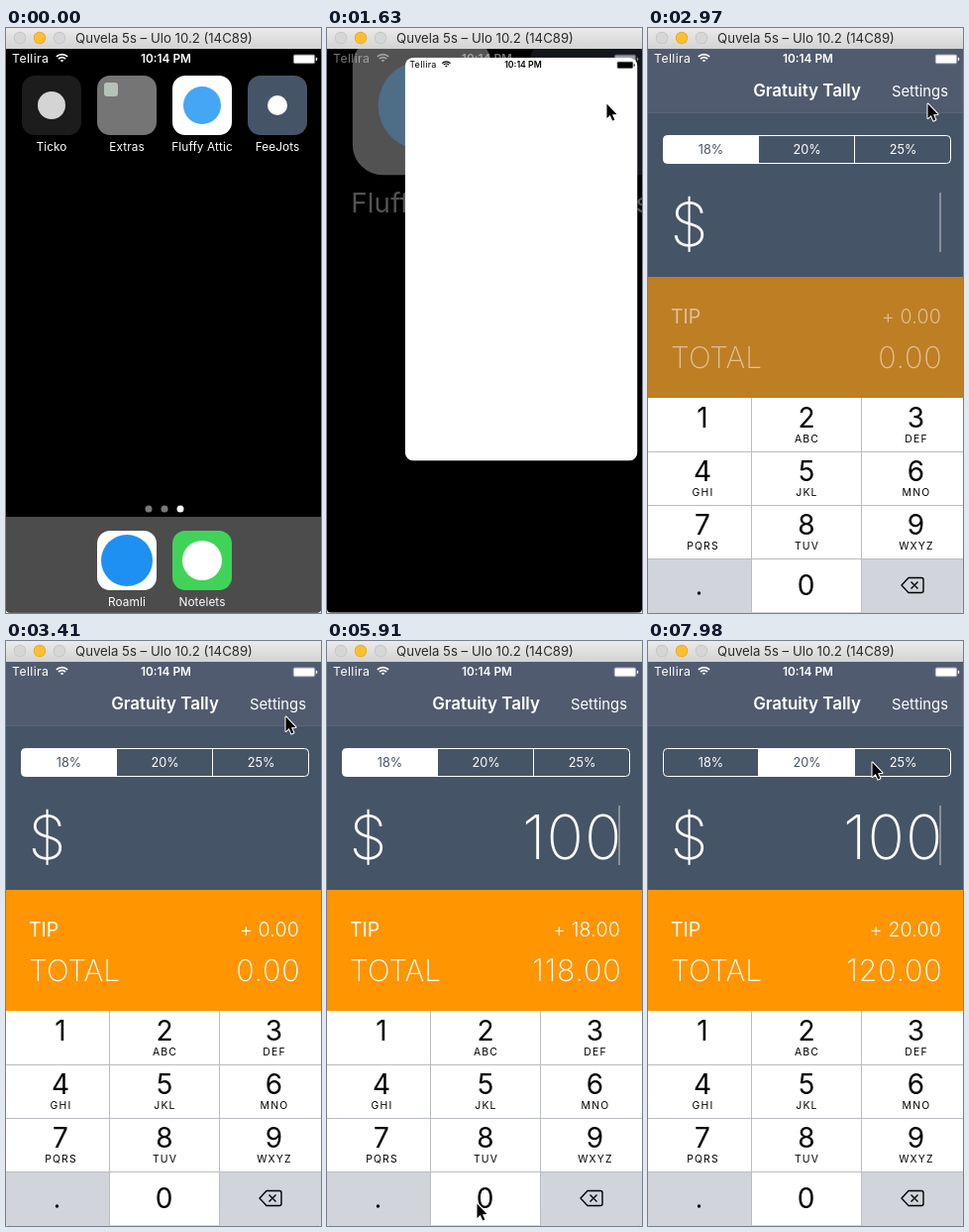
Animation, 318 px wide and 590 px high, one loop 8 s. Source, as an HTML page with a canvas:

```html
<!DOCTYPE html>
<html lang="en">
<head>
<meta charset="utf-8">
<title>Bill splitter</title>
<style>
  html, body { margin: 0; width: 100%; height: 100%; overflow: hidden; background: #fff; }
  canvas { display: block; width: 318px; height: 590px; }
</style>
</head>
<body>
<canvas id="stage"></canvas>
<script>
const W = 318, H = 590, TOP = 21;
const LOOP = 8000, REFRESH = LOOP / 54, LEAD = 25;
const APP_START = 2510, POINTER_START = 1030, RATE_TAP = 7530, HOLD = 150;
const SLATE = '#465467', ORANGE = '#ff9500', KEY_GREY = '#d1d4da', LINE = '#b9bcc1';

const canvas = document.getElementById('stage');
const ctx = canvas.getContext('2d');
const ratio = window.devicePixelRatio || 1;
canvas.width = W * ratio;
canvas.height = H * ratio;

const TAPS = [{ at: 4860, key: 1 }, { at: 5450, key: 0 }, { at: 5750, key: 0 }];
const MOVES = [
  { from: 1030, to: 1340, x: 282, y: 76 },
  { from: 3410, to: 4580, x: 78, y: 400 },
  { from: 5010, to: 5460, x: 151, y: 567 },
  { from: 6360, to: 7250, x: 175, y: 115 },
  { from: 7690, to: 8000, x: 226, y: 122 }
];

const progress = (t, from, to) => Math.min(1, Math.max(0, (t - from) / (to - from)));
const smooth = (t, from, to) => {
  const p = progress(t, from, to);
  return p * p * (3 - 2 * p);
};
const held = (t, at) => t >= at && t < at + HOLD;

function rect(x, y, w, h, color) {
  ctx.fillStyle = color;
  ctx.fillRect(x, y, w, h);
}

function roundPath(x, y, w, h, r) {
  ctx.beginPath();
  ctx.roundRect(x, y, w, h, r);
}

function roundFill(x, y, w, h, r, color) {
  roundPath(x, y, w, h, r);
  ctx.fillStyle = color;
  ctx.fill();
}

function disc(x, y, r, color) {
  ctx.beginPath();
  ctx.arc(x, y, r, 0, Math.PI * 2);
  ctx.fillStyle = color;
  ctx.fill();
}

function text(str, x, y, size, { weight = 400, color = '#fff', align = 'left', gap = 0 } = {}) {
  ctx.font = `${weight} ${size}px Inter, Roboto, sans-serif`;
  ctx.letterSpacing = gap + 'px';
  ctx.textAlign = align;
  ctx.fillStyle = color;
  ctx.fillText(str, x, y);
}

function layer(alpha, draw) {
  ctx.save();
  ctx.globalAlpha *= alpha;
  draw();
  ctx.restore();
}

function titleBar() {
  const shade = ctx.createLinearGradient(0, 0, 0, TOP);
  shade.addColorStop(0, '#ebebeb');
  shade.addColorStop(1, '#d3d3d3');
  rect(0, 0, W, TOP, shade);
  [14, 34, 54].forEach(x => {
    const lit = x === 34;
    disc(x, 10, 6.2, lit ? '#e3a526' : '#c2c2c2');
    disc(x, 10, 5.5, lit ? '#fdbe2f' : '#d6d6d6');
  });
  text('Quvela 5s – Ulo 10.2 (14C89)', 159.5, 15, 13.2, { color: '#2a2a2a', align: 'center' });
}

function statusBar(color) {
  text('Tellira', 6, 35.3, 12.3, { color, gap: 0.4 });
  ctx.strokeStyle = color;
  ctx.lineWidth = 1.7;
  [8, 5, 1.6].forEach(r => {
    ctx.beginPath();
    ctx.arc(56.5, 34.6, r, -Math.PI * 0.75, -Math.PI * 0.25);
    ctx.stroke();
  });
  text('10:14 PM', 161.5, 35.3, 11.8, { weight: 600, color, align: 'center' });
  layer(0.45, () => roundFill(289.8, 26.6, 22.4, 9.6, 2, color));
  roundFill(290.8, 27.6, 20.4, 7.6, 1, color);
  roundFill(312.8, 29.8, 1.4, 3.2, 0.7, color);
}

function appIcon(cx, y, label, tile, dot, r) {
  roundFill(cx - 30, y, 60, 60, 13, tile);
  if (r) disc(cx, y + 30, r, dot);
  text(label, cx, y + 76, 11.8, { align: 'center', gap: 0.1 });
}

function home(pressed) {
  appIcon(46, 48, 'Ticko', '#1c1c1c', '#d4d4d4', 14);
  appIcon(122, 48, 'Extras', '#757575');
  roundFill(99, 55, 14, 14, 3, '#b4c3b6');
  appIcon(198, 48, 'Fluffy Attic', '#fff', '#45a6f5', 19);
  appIcon(274, 48, 'FeeJots', SLATE, '#fff', 10);
  if (pressed) roundFill(244, 48, 60, 60, 13, 'rgba(0,0,0,.45)');
  [144, 160, 176].forEach(x => disc(x, 485, 3.5, x === 176 ? '#fff' : '#7a7a7a'));
  rect(0, 493, W, 97, '#4c4c4c');
  appIcon(122, 507, 'Roamli', '#fff', '#1e90f2', 26);
  appIcon(198, 507, 'Notelets', '#3fd458', '#fff', 20);
}

// The tapped icon grows into the white launch screen while the home screen zooms past.
function launching(t) {
  const p = smooth(t, 1400, 1770);
  const zoom = 1 + 1.98 * p;
  layer(1 - p, () => {
    ctx.translate(274, 78);
    ctx.scale(zoom, zoom);
    ctx.translate(-274, -78);
    home(t >= 1320);
  });
  layer(1 - 0.8 * p, () => statusBar('#fff'));
  if (p === 0) return;
  const x = 244 * (1 - p), y = 48 - 27 * p, w = 60 + 258 * p, h = 60 + 512 * p;
  layer(Math.min(1, p * 4), () => {
    roundPath(x, y, w, h, p < 1 ? 13 - 6 * p : 0);
    ctx.clip();
    rect(x, y, w, h, '#fff');
    ctx.translate(x, y);
    ctx.scale(w / W, w / W);
    ctx.translate(0, -TOP);
    statusBar('#000');
  });
}

function rateControl(t) {
  const chosen = t >= RATE_TAP + HOLD ? 1 : 0;
  const left = i => 15 + 97 * i;
  ctx.save();
  roundPath(15.5, 108.5, 290, 28, 4);
  ctx.clip();
  rect(left(chosen), 108, 97, 29, '#fff');
  if (held(t, RATE_TAP)) rect(left(1), 108, 97, 29, 'rgba(255,255,255,.25)');
  ctx.restore();
  ctx.strokeStyle = '#fff';
  ctx.lineWidth = 1;
  roundPath(15.5, 108.5, 290, 28, 4);
  ctx.stroke();
  [1, 2].forEach(i => rect(left(i) - 1, 108, 1, 29, '#fff'));
  ['18%', '20%', '25%'].forEach((label, i) =>
    text(label, left(i) + 48.5, 127, 12.7, { color: i === chosen ? SLATE : '#fff', align: 'center' }));
}

function amounts(t, bill) {
  const tip = bill * (t >= RATE_TAP + HOLD ? 0.2 : 0.18);
  const shown = smooth(t, 2520, 3260);
  layer(shown, () => rect(0, 251, W, 122, ORANGE));
  layer(shown ** 1.5, () => {
    text('TIP', 23, 298, 19.5);
    text('+ ' + tip.toFixed(2), 296, 298, 19.5, { weight: 300, align: 'right', gap: 0.2 });
    text('TOTAL', 23, 343, 30, { weight: 250 });
    text((bill + tip).toFixed(2), 297.5, 343, 30.5, { weight: 250, align: 'right', gap: 0.8 });
  });
}

function caret(t) {
  const lastTyped = TAPS[TAPS.length - 1].at + HOLD;
  const firstTyped = TAPS[0].at + HOLD;
  const idle = t >= lastTyped ? t - lastTyped : t >= firstTyped ? 0 : t - APP_START;
  if (idle % 950 <= 610) rect(294, 166, 2, 60, '#8b8f95');
}

function eraseKey() {
  ctx.strokeStyle = '#000';
  ctx.lineWidth = 1.4;
  ctx.lineJoin = 'round';
  ctx.beginPath();
  ctx.moveTo(256, 562);
  ctx.lineTo(263, 554.5);
  ctx.arcTo(278, 554.5, 278, 562, 2);
  ctx.arcTo(278, 569.5, 263, 569.5, 2);
  ctx.lineTo(263, 569.5);
  ctx.closePath();
  [-3.5, 3.5].forEach(d => {
    ctx.moveTo(269 - d, 558.5);
    ctx.lineTo(269 + d, 565.5);
  });
  ctx.stroke();
}

function keypad(t) {
  const letters = ['', 'ABC', 'DEF', 'GHI', 'JKL', 'MNO', 'PQRS', 'TUV', 'WXYZ'];
  const centres = [55, 160, 270.5];
  const black = { color: '#000', align: 'center' };
  const pressed = TAPS.find(tap => held(t, tap.at));
  rect(0, 373, W, 217, '#fff');
  rect(0, 535, 104, 55, KEY_GREY);
  rect(216, 535, 102, 55, KEY_GREY);
  if (pressed) rect(...(pressed.key ? [0, 373] : [105, 535]), 110 - 6 * pressed.key, 55, KEY_GREY);
  [427, 481, 535].forEach(y => rect(0, y, W, 1, LINE));
  [104, 215].forEach(x => rect(x, 373, 1, 217, LINE));
  letters.forEach((word, i) => {
    const x = centres[i % 3], y = 373 + 54 * Math.floor(i / 3);
    text(String(i + 1), x, y + 30, 28, black);
    text(word, x + 0.5, y + 45, 10.4, { ...black, gap: 1.2 });
  });
  text('0', 159.5, 572, 28, black);
  disc(51.5, 570, 1.7, '#000');
  eraseKey();
}

function app(t) {
  const digits = TAPS.filter(tap => t >= tap.at + HOLD).map(tap => tap.key).join('');
  rect(0, TOP, W, H - TOP, SLATE);
  rect(0, TOP, W, 64, '#515b6f');
  rect(0, 85, W, 1, '#5b6579');
  text('Gratuity Tally', 160.5, 69, 16.9, { weight: 600, align: 'center' });
  text('Settings', 303, 68.5, 14.8, { align: 'right' });
  rateControl(t);
  text('$', 22.5, 220, 61, { weight: 200 });
  text(digits, 298.5, 220, 62, { weight: 200, align: 'right', gap: 1 });
  caret(t);
  amounts(t, Number(digits));

  rect(0, 373, W, 217, '#f8f8f8');
  text('÷ 2', 23, 428, 19.5, { weight: 300, color: '#666' });
  text('0.00', 296, 428, 19.5, { weight: 300, color: '#666', align: 'right' });
  ctx.save();
  ctx.translate(0, 89 * (1 - progress(t, 2520, 2960)) ** 3);
  keypad(t);
  ctx.restore();

  layer(0.757 * (1 - progress(t, 2520, 2810)), () => rect(0, TOP, W, H - TOP, '#fff'));
  statusBar(t < 2600 ? '#3a3a3a' : '#fff');
}

function pointer(t) {
  let x = 308, y = 132;
  for (const move of MOVES) {
    const p = smooth(t, move.from, move.to);
    x += (move.x - x) * p;
    y += (move.y - y) * p;
  }
  ctx.save();
  ctx.translate(x, y);
  ctx.beginPath();
  [[0.5, 0.5], [0.5, 15], [3.8, 12], [6.2, 17.5], [8.4, 16.5], [6, 11.2], [10.5, 11]]
    .forEach(p => ctx.lineTo(...p));
  ctx.closePath();
  ctx.lineJoin = 'round';
  ctx.lineWidth = 2;
  ctx.strokeStyle = '#fff';
  ctx.stroke();
  ctx.fillStyle = '#000';
  ctx.fill();
  ctx.restore();
}

function draw(t) {
  ctx.setTransform(ratio, 0, 0, ratio, 0, 0);
  rect(0, 0, W, H, '#e4e4e4');
  titleBar();
  ctx.save();
  roundPath(0, TOP, W, 568.5, [0, 0, 4, 4]);
  ctx.clip();
  rect(0, TOP, W, H - TOP, '#000');
  if (t < APP_START) launching(t);
  else app(t);
  if (t >= POINTER_START) pointer(t);
  ctx.restore();
}

const start = performance.now();
function tick() {
  const t = (performance.now() - start) % LOOP;
  draw(REFRESH * Math.floor((t + LEAD) / REFRESH));
  requestAnimationFrame(tick);
}
tick();
</script>
</body>
</html>
```
